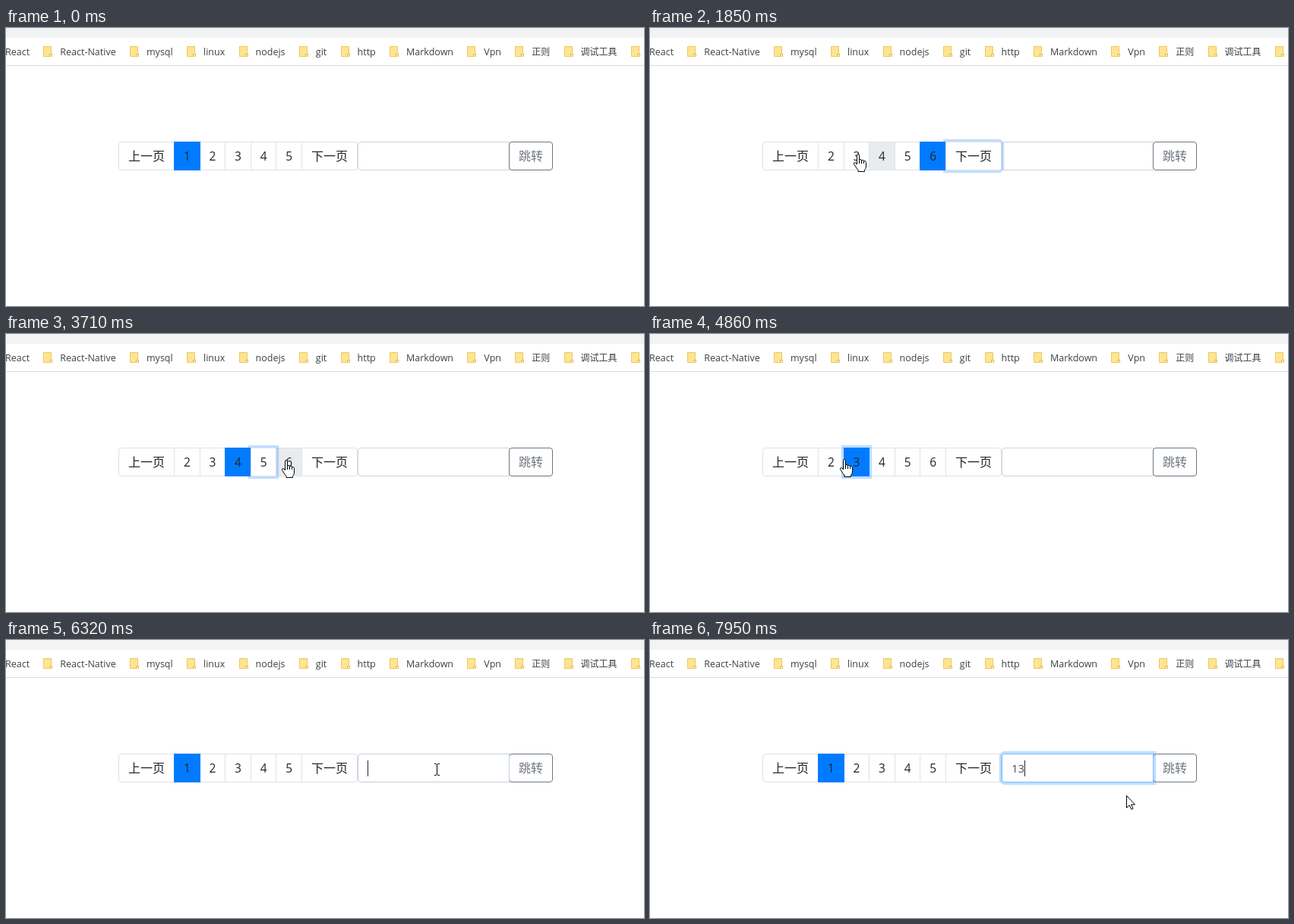
Write an HTML page that moves like this. It is 840 px wide and 367 px high and loops after 8000 ms.

```html
<!DOCTYPE html>
<html lang="zh">
<head>
<meta charset="utf-8">
<title>Pagination</title>
<style>
  html, body { margin: 0; width: 100%; height: 100%; overflow: hidden; background: #fff; }
  body { position: relative; font: 16px/36px "Open Sans", "Noto Sans CJK SC", "Noto Sans CJK", sans-serif; color: #212529; }
  .strip { position: absolute; top: 0; left: 0; width: 100%; height: 13px; background: #f1f3f4; }
  .rule { position: absolute; top: 49px; left: 0; width: 100%; height: 1px; background: #dadce0; }
  #marks { position: absolute; top: 22px; left: -1px; width: 836px; height: 19px; display: flex;
           justify-content: space-between; font-size: 12.5px; line-height: 19px; white-space: nowrap; color: #3c4043; }
  #marks div { display: flex; gap: 10px; }
  #marks svg { width: 12px; height: 14px; margin-top: 2px; }
  .cjk { font-size: 12px; }
  #pager { position: absolute; left: 148px; top: 150px; height: 38px; display: flex; }
  .box { flex: none; box-sizing: border-box; height: 38px; padding: 0 12px; margin-left: -1px;
         border: 1px solid #dee2e6; background: #fff; text-align: center; white-space: nowrap; }
  .num { width: 34.6px; padding: 0; font-size: 15.5px; }
  .prev { margin-left: 0; border-radius: 4px 0 0 4px; }
  .next { border-radius: 0 4px 4px 0; }
  .field { width: 200px; margin-left: 0; border-color: #ced4da; border-radius: 4px 0 0 4px;
           display: flex; align-items: center; font-size: 15px; color: #495057; }
  .caret { width: 1px; height: 21px; background: #212529; }
  .jump { border-color: #6c757d; border-radius: 4px; color: #6c757d; }
  .hover { background: #e9ecef; }
  .jump.hover { background: #6c757d; color: #fff; }
  .active { background: #007bff; border-color: #007bff; z-index: 1; }
  .focus { box-shadow: 0 0 0 3.2px rgba(0, 123, 255, .25); z-index: 2; }
  #pointer { position: absolute; left: 0; top: 0; width: 40px; height: 40px; overflow: visible; z-index: 9; }
  #pointer path { stroke: #000; stroke-linejoin: round; fill: #fff; }
  #pointer .line { fill: none; }
</style>
</head>
<body>
<div class="strip"></div>
<div id="marks"></div>
<div class="rule"></div>
<div id="pager"></div>
<svg id="pointer">
  <g id="arrow"><path d="M.5.5V16.5L4.2 13 6.7 18.5 9 17.5 6.6 12.2H11.5Z"/></g>
  <g id="hand">
    <path d="M-1.5 13V1.2Q-1.5-.5 0-.5T1.5 1.2V7.5Q1.8 6.5 3 6.5T4.5 8Q5 7.2 6.2 7.3T7.5 9Q8 8.3 9 8.5T10.5 10.5V16Q10.5 18.5 8.5 20.5V22.5H0V20.5Q-2 18.5-4 15L-5.5 12.5Q-6 10.5-4.3 10.5-3 10.7-1.5 13Z"/>
    <path class="line" d="M1.5 7.5V12M4.5 8V12M7.5 9V12"/>
  </g>
  <g id="beam"><path class="line" d="M-3-7.5H-1L.5-6.5 2-7.5H4M.5-6.5V6.5M-3 7.5H-1L.5 6.5 2 7.5H4"/></g>
</svg>
<script>
const LOOP = 8000, TICK = LOOP / 104;
const PREV = 0, NEXT = 6, FIELD = 7, PAGES = 5;
const TEXT = "13", FOCUS_AT = 6290, FIRST_KEY = 7410, KEY_GAP = 390;

const clamp = (v, low, high) => Math.max(low, Math.min(high, v));
const mix = (a, b, k) => a + (b - a) * k;
const repeat = (count, make) => Array.from({ length: count }, (_, i) => make(i));
const click = (box, press, hold) => ({ box, press, release: press + hold });

const clicks = [
  ...repeat(5, i => click(NEXT, 840 + 160 * i, 300)),
  ...repeat(4, i => click(PREV, 2310 + 160 * i, 70)),
  ...repeat(4, i => click(2 + i, 3240 + 230 * i, 80)),
  click(2, 4710, 150),
  click(1, 5170, 70),
  click(PREV, 5710, 150),
  click(FIELD, FOCUS_AT, 0)
];

// pointer rests: arrive, leave, x, y
const stops = [
  [0, 0, 716, 375], [460, 460, 235, 195], [920, 1650, 420, 162], [1850, 1850, 274, 167],
  [2150, 2960, 163, 162], [3690, 3830, 369, 167], [4230, 4230, 360, 188], [4690, 4880, 256, 166],
  [5030, 5300, 221, 173], [5600, 5860, 180, 172], [6300, 6640, 567, 171], [6850, 7230, 690, 176],
  [7600, LOOP, 627, 205]
];

function add(parent, className, text = "") {
  const el = document.createElement("div");
  el.className = className;
  el.textContent = text;
  parent.append(el);
  return el;
}

const folder = `<svg><path d="M.5.5H10.5V10.5H11.5V13.5H.5Z" fill="#ffe591" stroke="#eac95f"/>
  <path d="M8.5 13V10.5H11.5V13.5" fill="#fff0bd" stroke="#e0b94c"/></svg>`;
const names = ["React", "React-Native", "mysql", "linux", "nodejs", "git", "http", "Markdown", "Vpn", "正则", "调试工具", ""];
names.forEach((name, i) => {
  const el = add(marks, /^[\w-]*$/.test(name) ? "" : "cjk", name);
  if (i > 0) el.insertAdjacentHTML("afterbegin", folder);
});

const els = [
  add(pager, "box prev", "上一页"),
  ...repeat(PAGES, () => add(pager, "box num")),
  add(pager, "box next", "下一页"),
  add(pager, "box field"),
  add(pager, "box jump", "跳转")
];
const typed = add(els[FIELD], "");
const caret = add(els[FIELD], "caret");
const shapes = [arrow, hand, beam];

function pointerAt(t) {
  const next = stops.findIndex(stop => stop[0] > t);
  const [, leave, x0, y0] = stops.at(next < 0 ? -1 : next - 1);
  if (next < 0 || t <= leave) return [x0, y0];
  const [arrive, , x1, y1] = stops[next];
  const rest = (arrive - t) / (arrive - leave), k = 1 - rest * rest;
  return [mix(x0, x1, k), mix(y0, y1, k)];
}

function boxAt([x, y]) {
  return els.findLastIndex(el => {
    const r = el.getBoundingClientRect();
    return x >= r.left && x < r.right && y >= r.top && y < r.bottom;
  });
}

function pagerAt(t) {
  let first = 1, active = 1, focus = -1;
  for (const { box, press, release } of clicks) {
    if (press <= t) focus = box;
    if (release > t || box === FIELD) continue;
    if (box === NEXT) active++;
    else if (box === PREV) active--;
    else active = first + box - 1;
    first = clamp(first, active - PAGES + 1, active);
  }
  return { first, active, focus };
}

function drawField(t, held) {
  const glow = clamp((held - FOCUS_AT) / 150, 0, 1);
  const rgb = [[206, 128], [212, 189], [218, 255]].map(([a, b]) => mix(a, b, glow));
  els[FIELD].style.borderColor = `rgb(${rgb})`;
  els[FIELD].style.boxShadow = `0 0 0 ${3.2 * glow}px rgba(0, 123, 255, ${.25 * glow})`;

  const keys = clamp(Math.floor((t - FIRST_KEY) / KEY_GAP) + 1, 0, TEXT.length);
  const since = t - (keys ? FIRST_KEY + KEY_GAP * (keys - 1) : FOCUS_AT);
  typed.textContent = TEXT.slice(0, keys);
  caret.style.visibility = since >= 0 && since % 1060 < 530 ? "visible" : "hidden";
}

function draw(t) {
  const held = Math.floor((t + 20) / TICK) * TICK; // the screen refreshes once per tick
  const hovered = boxAt(pointerAt(Math.max(0, held - TICK))); // highlight trails the pointer
  const { first, active, focus } = pagerAt(t);

  els.forEach((el, i) => {
    const isPage = i > PREV && i < NEXT, page = first + i - 1;
    if (isPage) el.textContent = page;
    el.classList.toggle("active", isPage && page === active);
    el.classList.toggle("hover", i === hovered && i !== FIELD);
    el.classList.toggle("focus", i === focus);
  });
  drawField(t, held);

  const spot = pointerAt(held), over = boxAt(spot);
  const shape = over < 0 ? arrow : over === FIELD ? beam : hand;
  for (const el of shapes) el.style.display = el === shape ? "" : "none";
  pointer.style.transform = `translate(${spot.map(v => Math.round(v) + "px")})`;
}

const start = performance.now();
function loop() {
  draw((performance.now() - start) % LOOP);
  requestAnimationFrame(loop);
}
loop();
</script>
</body>
</html>
```
